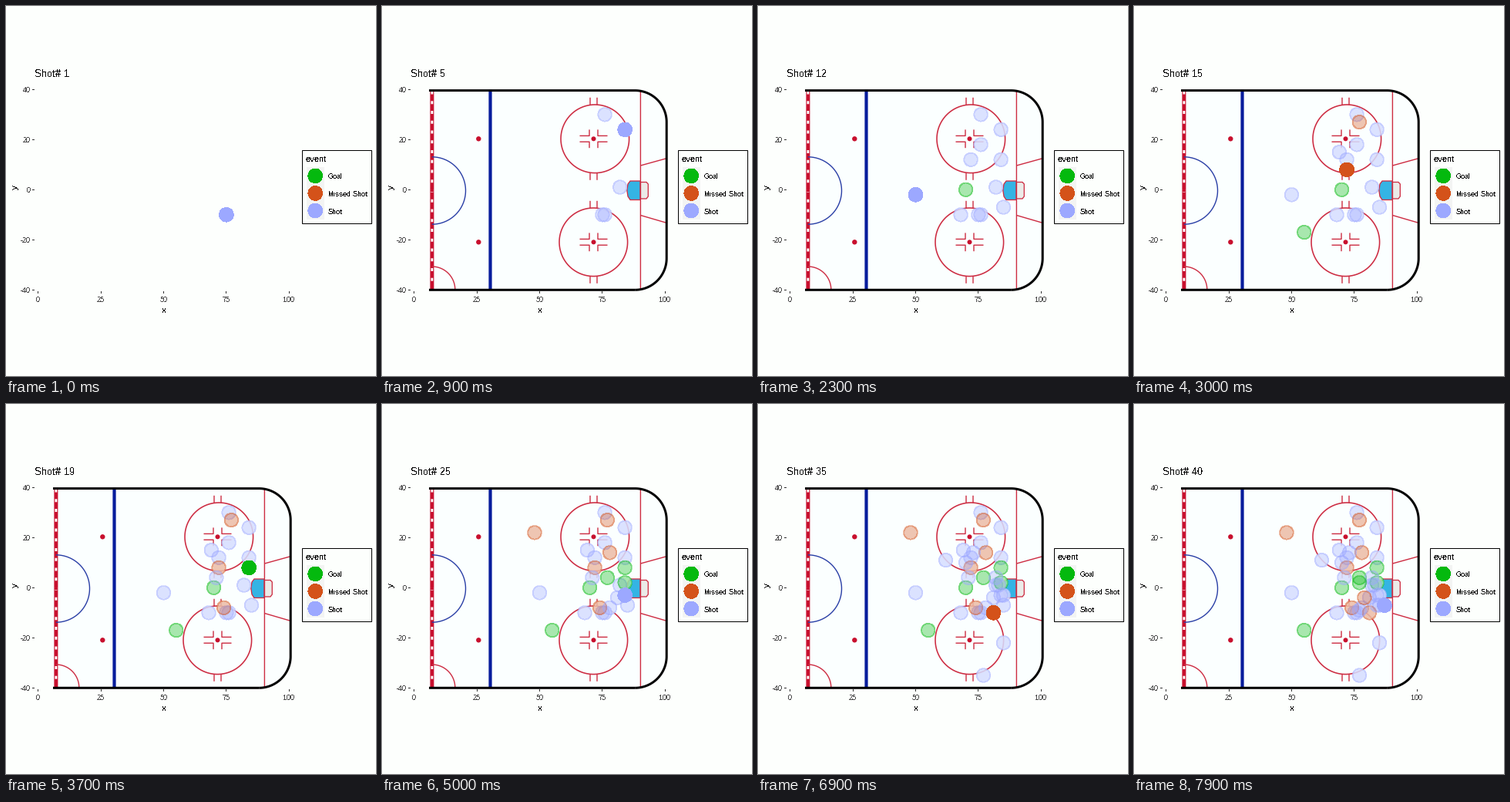
Recreate the animation shown at these times as a matplotlib script. Size 480 px wide and 480 px high, loop 8 s.

```python
import numpy as np
import matplotlib.pyplot as plt
from matplotlib.animation import FuncAnimation
from matplotlib.patches import Circle, Rectangle, Polygon

SIZE, DPI = 480, 100
FRAMES, INTERVAL = 80, 100
PX = 72 / DPI                      # points per pixel
BG, ICE = "#fdfffd", "#fbffff"
RED, BLUE, GREY = "#c8102e", "#081c9c", "#4d4d4d"
THIN_RED, THIN_BLUE = "#cd2c42", "#2a3fa6"
COLORS = {"G": "#04b90e", "M": "#d4521a", "S": "#9ca8ff"}

# shots in order: kind, x, y
SHOTS = [s.split(",") for s in """
S,75,-10 S,82,1 S,76,30 S,76,-10 S,84,24 S,84,12 S,85,-7 S,68,-10
S,72,12 G,70,0 S,76,18 S,50,-2 M,77,27 S,69,15 G,55,-17 M,72,8
S,71,4 M,74,-8 G,84,8 M,48,22 G,77,4 M,78,14 S,81,-4 G,84,2
S,78,-8 S,84,-3 S,85,-3 S,82,4 S,70,10 S,85,-22 S,73,14 S,77,-35
S,62,11 S,83,1 M,81,-10 S,77,-9 G,77,2 M,79,-4 S,84,-7 S,87,-7
""".split()]

# crisp, fully hinted screen text
plt.rcParams.update({"font.family": "Liberation Sans",
                     "text.hinting": "native",
                     "text.hinting_factor": 1,
                     "text.antialiased": False})
fig = plt.figure(figsize=(SIZE / DPI, SIZE / DPI), dpi=DPI, facecolor=BG)
ax = fig.add_axes([0, 0, 1, 1])
ax.set_xlim(0, SIZE)
ax.set_ylim(SIZE, 0)
ax.axis("off")

rink = []


def to_px(x, y):
    return 41.6 + 3.257 * x, 238.3 - 3.25 * y


def text(x, y, s, size, color="black", **kw):
    return ax.text(x, y, s, fontsize=size * PX, color=color, **kw)


def line(xs, ys, color=THIN_RED, width=1.4, z=2):
    art, = ax.plot(xs, ys, color=color, lw=width * PX, zorder=z, snap=False,
                   solid_capstyle="butt", solid_joinstyle="round")
    return art


def mark(*args, **kw):
    rink.append(line(*args, **kw))


def patch(shape, z=2):
    rink.append(ax.add_patch(shape))
    shape.set(zorder=z, snap=False)


def arc(cx, cy, r, a0, a1, n=60):
    t = np.radians(np.linspace(a0, a1, n))
    return cx + r * np.cos(t), cy + r * np.sin(t)


def spot(x, y, r=3.2):
    patch(Circle((x, y), r, fc=RED, lw=0), 3)


def dot(x, y, kind, **kw):
    c = COLORS[kind]
    return ax.add_patch(Circle((x, y), 8.8, fc=c, ec=c, lw=0.9 * PX,
                               antialiased=False, **kw))


def draw_rink():
    left, right, top, bottom, r = 61, 369.2, 109.6, 368.3, 41
    ux, uy = arc(right - r, top + r, r, -90, 0)
    lx, ly = arc(right - r, bottom - r, r, 0, 90)
    xs = np.concatenate([[left], ux, lx, [left]])
    ys = np.concatenate([[top], uy, ly, [bottom]])
    patch(Polygon(np.c_[xs, ys], fc=ICE, lw=0), 1)
    mark(xs[:-1], ys[:-1], "black", 3, z=4)
    mark([right - r, left], [bottom, bottom], "black", 3, z=4)

    # centre and blue lines
    mark([64.9, 64.9], [top, bottom], RED, 5)
    for y in np.arange(112.5, 366, 12.75):
        patch(Rectangle((63.5, y - 2), 2.8, 4, fc="white", lw=0), 3)
    mark(*arc(64.8, 239.5, 43.7, -90, 90), color=THIN_BLUE)
    spot(64.9, 239.5, 2)
    mark(*arc(64.8, 368, 30, -90, 0))
    mark([140.5, 140.5], [top, bottom], BLUE, 4.2)

    # face-off spots and circles
    for cx, cy in ((276.3, 172.3), (274.3, 306.3)):
        spot(125.3, cy)
        spot(274.5, cy, 3)
        mark(*arc(cx, cy, 44.3, 0, 360, 120), width=1.6)
        for sx in (-1, 1):
            for sy in (-1, 1):
                x, y = 274.5 + 5.5 * sx, cy + 3.9 * sy
                mark([x + 12.5 * sx, x, x], [y, y, y + 8 * sy])
                x = 274.5 + 4.5 * sx
                mark([x, x], [cy + 44 * sy, cy + 53.5 * sy])

    # goal end
    mark([335.4, 335.4], [top, bottom])
    mark([335.4, 368], [207, 198])
    mark([335.4, 368], [271.5, 281])
    patch(Polygon([(335, 227), (322, 227), (319, 231), (317.8, 239),
                   (319, 247), (322, 251.5), (335, 251.5)],
                  fc="#34b4e4", ec=THIN_RED, lw=1.3 * PX))
    patch(Polygon([(335.5, 228.5), (343, 228.5), (345.3, 231), (345.3, 247),
                   (343, 250), (335.5, 250)], fc="#ebebe8", ec=THIN_RED,
                  lw=1.3 * PX))


def draw_axes():
    for v in (-40, -20, 0, 20, 40):
        y = to_px(0, v)[1]
        line([34, 37], [int(y) + 0.5] * 2, "#333333", 1)
        text(32, y + 3.7, str(v), 9, GREY, ha="right")
    for v in (0, 25, 50, 75, 100):
        x = to_px(v, 0)[0]
        line([int(x) + 0.5] * 2, [370, 373], "#333333", 1)
        text(x, 384, str(v), 9, GREY, ha="center")
    text(205, 398, "x", 11, ha="center")
    text(12, 234.5, "y", 11, ha="center", va="center", rotation=90)


def draw_legend():
    ax.add_patch(Rectangle((384.5, 187.5), 90, 95, fc=BG, ec="black",
                           lw=PX, snap=False))
    ax.add_patch(Rectangle((389.5, 209), 23, 68, fc="#f3f4f3", lw=0))
    text(389, 202.5, "event", 11)
    rows = (("G", "Goal"), ("M", "Missed Shot"), ("S", "Shot"))
    for i, (kind, label) in enumerate(rows):
        y = 220.3 + 22.6 * i
        dot(401.2, y, kind, zorder=5)
        text(418, y + 4.2, label, 9)


draw_rink()
draw_axes()
draw_legend()
title = text(37, 91.5, "", 13)

# an icy backing keeps the rink from showing through faded dots
dots, backs = [], []
for i, (kind, x, y) in enumerate(SHOTS):
    pos = to_px(float(x), float(y))
    dots.append(dot(*pos, kind, zorder=10 + 0.01 * i))
    backs.append(ax.add_patch(Circle(pos, 9, fc=ICE, lw=0, alpha=0.8,
                                     zorder=8)))


def update(i):
    # the title lags slightly behind the dots
    title.set_text(f"Shot# {1 + i * 49 // 99}")
    for art in rink:
        art.set_visible(i > 0)
    now = i // 2
    for n, (d, b) in enumerate(zip(dots, backs)):
        d.set_visible(n <= now)
        d.set_alpha(1 if n == now else 1 / 3)
        b.set_visible(n < now)
    return [title, *rink, *backs, *dots]


anim = FuncAnimation(fig, update, frames=FRAMES, interval=INTERVAL,
                     init_func=lambda: update(0), repeat=True,
                     repeat_delay=0, blit=False)
plt.show()
```
